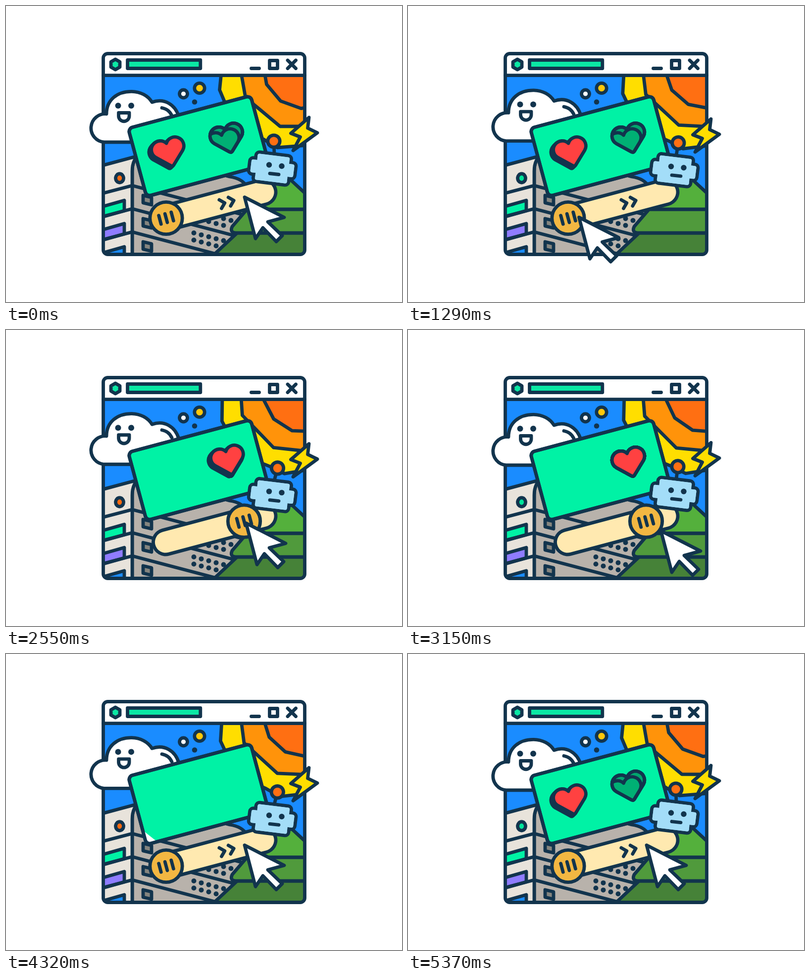
Recreate the animation shown at these times as an HTML page. Size 800x600 px, loop 5.4 s.

```html
<!DOCTYPE html>
<html lang="en">
<head>
<meta charset="utf-8">
<title>Slide the heart</title>
<style>
html, body { margin: 0; width: 100%; height: 100%; overflow: hidden; background: #fff; }
svg { display: block; width: 800px; height: 600px; }
.ink { stroke: #12344d; stroke-width: 6.8; stroke-linejoin: round; stroke-linecap: round; }
.line { fill: none; }
.dot { fill: #12344d; }
</style>
</head>
<body>
<svg viewBox="0 0 800 600">
  <defs>
    <path id="heart" d="M0-17.200A18 18 0 1 0-28.500 4.500L-3 29Q0 31.500 3 29L28.500 4.500A18 18 0 1 0 0-17.200Z"/>
    <rect id="cardShape" x="-128" y="-71.500" width="256" height="143" rx="9" transform="translate(389 284) rotate(-15)"/>
    <clipPath id="view"><rect x="196.500" y="140" width="407" height="363.500" rx="6"/></clipPath>
    <clipPath id="cardClip"><use href="#cardShape"/></clipPath>
    <clipPath id="slotClip"><use href="#heart" transform="translate(447 267) rotate(-15)"/></clipPath>
    <clipPath id="keep"><rect id="keepRect" x="-500" width="2000" height="1500" transform="rotate(38.7)"/></clipPath>
  </defs>

  <rect x="196.500" y="96.500" width="407" height="407" rx="9" fill="#fff"/>
  <g clip-path="url(#view)" class="ink">
    <rect x="190" y="140" width="420" height="370" fill="#1a8cff" stroke="none"/>
    <path id="sunOuter" fill="#ffde00" d="M437 115L431.500 170L447 207L470 245L520 270L548 287L625 281L700 120L600 20Z"/>
    <path id="sunMiddle" fill="#ff930a"/>
    <path id="sunInner" fill="#ff6f12"/>

    <path fill="#b8b2ab" d="M255 510V335Q255 307 274 302L400 332L452 346Q478 350 486 366L500 510Z"/>
    <path fill="#e8e3db" d="M190 324.500L274 302Q255 307 255 335V510H190Z"/>
    <g id="server"></g>
    <ellipse id="led" cx="229.500" cy="349" rx="8" ry="9"/>

    <path fill="#468238" d="M467 460L418 506H610V460Z"/>
    <path fill="#509a3c" d="M487 412L457 447Q451 460 466 460H610V412Z"/>
    <path fill="#54b03c" d="M553 332L487 412H610V385Z"/>
  </g>

  <g class="ink line">
    <rect x="196.500" y="96.500" width="407" height="407" rx="9"/>
    <path d="M196.500 140.700H603.500M495.500 126.500H511.500M532.500 110.500H548.500V126.500H532.500ZM569 110L585.500 126.500M585.500 110L569 126.500"/>
    <path fill="#0be8a4" d="M221 108L230 113.200V123.800L221 129L212 123.800V113.200ZM245.500 109.500H392.800V126.500H245.500Z"/>
    <circle cx="358.500" cy="178" r="8" fill="#fff"/>
    <circle cx="391" cy="166.500" r="10.200" fill="#ffc80a"/>
  </g>
  <circle class="dot" cx="381" cy="194.500" r="5.300"/>

  <g id="cloud" class="ink" fill="#fff">
    <path d="M198 276A28.700 28.700 0 1 1 203 218.800C203 190 225 173.300 253 173.300C272 173.300 287 182 295 195C320 186 342 200 349 224V276Z"/>
    <path class="line" d="M315 206.500Q329 209 335 222"/>
    <path d="M227.500 216.500H249V223A10.700 10.700 0 0 1 227.500 223Z"/>
    <g class="dot" stroke="none"><circle cx="226.500" cy="202" r="6"/><circle cx="253" cy="202" r="6"/></g>
  </g>

  <path id="bolt" class="ink" fill="#ffde00" d="M612 226L575.500 258L594.500 265.500L580 293L629 257L609.500 247.500Z"/>

  <g id="pill" stroke-linecap="round">
    <path d="M322.500 430L520 377.300" stroke="#12344d" stroke-width="56.800"/>
    <path d="M322.500 430L520 377.300" stroke="#ffe9b0" stroke-width="43.200"/>
  </g>
  <g id="chevrons" class="ink line">
    <path transform="translate(437 400.500) rotate(-15)" d="M-4-9L5 0L-4 9M15-9L24 0L15 9"/>
  </g>

  <use href="#cardShape" class="ink" fill="#00f2a5"/>
  <g clip-path="url(#cardClip)">
    <rect id="shine" x="-500" width="2000" height="90" fill="#fff" transform="rotate(38.7)"/>
  </g>
  <g clip-path="url(#keep)">
    <g id="slot" class="ink" fill="#00b074">
      <use href="#heart" transform="translate(447 267) rotate(-15)" fill="#00a56d"/>
      <g clip-path="url(#slotClip)"><use href="#heart" transform="translate(440 278.500) rotate(-15)"/></g>
      <use href="#heart" transform="translate(447 267) rotate(-15)" fill="none"/>
    </g>
    <g id="piece" class="ink">
      <g id="depth" fill="#12344d"></g>
      <use href="#heart" transform="rotate(-15)" fill="#ff4141"/>
    </g>
  </g>
  <use href="#cardShape" class="ink line"/>

  <g id="handle" class="ink">
    <circle r="32.700" fill="#f2b742"/>
    <path transform="rotate(-15)" d="M-13-9V9M0-9V9M13-9V9"/>
  </g>

  <g id="robot">
    <g id="antenna" class="ink">
      <path d="M0 0L-1-24"/>
      <circle cx="-1" cy="-26" r="12.200" fill="#ff6f12"/>
    </g>
    <g transform="translate(538 329.500) rotate(7)" fill="#a3ddf8">
      <g class="ink">
        <rect x="-36" y="-30" width="72" height="60" rx="7"/>
        <rect x="-47" y="-17" width="94" height="33" rx="7"/>
      </g>
      <rect x="-32.600" y="-26.600" width="65.200" height="53.200" rx="4"/>
      <rect x="-43.600" y="-13.600" width="87.200" height="26.200" rx="4"/>
    </g>
    <circle class="dot" cx="531.500" cy="322" r="5.700"/>
    <circle class="dot" cx="557" cy="324.500" r="5.700"/>
    <path class="ink" d="M533 339.500L551 341.500"/>
  </g>

  <path id="cursor" class="ink" fill="#fff" d="M0 0L80 41L47 50L76 78L64 90L37 62L22 84Z"/>
</svg>

<script>
const LOOP = 5400, BOB = 1800;
const el = id => document.getElementById(id);
const set = (id, name, value) => el(id).setAttribute(name, value);
const clamp = x => Math.min(1, Math.max(0, x));
const ramp = (t, from, to) => clamp((t - from) / (to - from));
const inOut = x => x < .5 ? 2 * x * x : 1 - 2 * (1 - x) ** 2;
const ease = (t, from, to) => inOut(ramp(t, from, to));
const pop = x => 1 + 2.2 * (x - 1) ** 3 + 1.2 * (x - 1) ** 2;
const mix = (a, b, k) => a.map((v, i) => v + (b[i] - v) * k);
const move = p => `translate(${p[0]} ${p[1]})`;

function polygon(cx, cy, radius, sides, start) {
  const points = Array.from({ length: sides }, (_, i) => {
    const a = (start + i * 360 / sides) * Math.PI / 180;
    return `${cx + radius * Math.cos(a)} ${cy + radius * Math.sin(a)}`;
  });
  return 'M' + points.join('L') + 'Z';
}

function buildServer() {
  let art = '';
  ['#00f2a5', '#8f7cff', '#1a8cff'].forEach((color, i) => {
    const y = i * 47;
    art += `<path fill="${color}" d="M190 ${408 + y}L239 ${394 + y}V${415 + y}L190 ${429 + y}Z"/>
      <path fill="#85857f" d="M277 ${384 + y}L294 ${388 + y}V${403 + y}L277 ${399 + y}Z"/>
      <path class="line" d="M190 ${381 + y}L255 ${364 + y}L475 ${422 + y}"/>`;
  });
  const rows = [[379.5, 460, 5], [379.5, 474.5, 5], [409.5, 437, 3], [424.5, 427, 3]];
  for (const [x, y, count] of rows)
    for (let i = 0; i < count; i++)
      art += `<circle class="dot" stroke="none" cx="${x + i * 15}" cy="${y + i * 3.9}" r="5"/>`;
  el('server').innerHTML = art;
}

const REST = [482, 387.5], GRAB = [330, 433], DROP = [485, 391.5], AWAY = [529, 418];

function cursorAt(t) {
  if (t < 1800) return mix(REST, GRAB, ease(t, 780, 1440));
  if (t < 2800) return mix(GRAB, DROP, ease(t, 1870, 2550));
  if (t < 3700) return mix(DROP, AWAY, ease(t, 2850, 3400));
  return mix(AWAY, REST, ease(t, 3750, 4300));
}

function update(t) {
  const bob = (1 - Math.cos(2 * Math.PI * t / BOB)) / 2;
  set('cloud', 'transform', move([0, -4 * bob]));
  set('bolt', 'transform', move([0, 5 * bob]));
  set('robot', 'transform', move([0, 5.5 * bob]));
  set('antenna', 'transform', `translate(542 300) rotate(${18 * bob})`);
  set('led', 'fill', t % BOB < 900 ? '#ff6a10' : '#00e59b');

  const turn = 1 - Math.abs(t / LOOP * 2 - 1);
  set('sunOuter', 'transform', `rotate(${-5.3 * turn} 603 122)`);
  set('sunMiddle', 'd', polygon(599, 119, 133, 9, 110 + 6.4 * turn));
  set('sunInner', 'd', polygon(603.5, 123, 85, 12, 125 - 18.5 * turn));

  set('cursor', 'transform', move(cursorAt(t)));
  const drag = ease(t, 1870, 2550);
  const slide = drag - ease(t, 3900, 4250);
  set('handle', 'transform', move(mix([323.5, 430], [481, 387.5], slide)));
  set('chevrons', 'opacity', 1 - ramp(t, 1900, 2050) + ramp(t, 4120, 4270));

  // A white band crosses the card and takes the solved heart with it.
  const edge = -260 + 385 * ramp(t, 3760, 4350);
  set('shine', 'y', edge);
  el('shine').style.display = t > 3760 && t < 4350 ? '' : 'none';
  const reset = t >= 4350;
  set('keepRect', 'y', reset ? -1000 : edge - (t < 3760 ? 600 : 0));

  const seat = reset ? 0 : ease(t, 2620, 2880);
  const pos = mix(mix([328.5, 295], [448.5, 263], reset ? 0 : drag), [447, 267], seat);
  const size = reset ? pop(ramp(t, 4600, 4950)) : 1;
  const slotSize = reset ? pop(ramp(t, 4480, 4830)) : 1;
  set('piece', 'transform', `${move(pos)} scale(${Math.max(0, size)})`);
  set('slot', 'transform', `translate(447 267) scale(${Math.max(0, slotSize)}) translate(-447 -267)`);
  el('piece').style.display = size > .02 ? '' : 'none';
  el('slot').style.display = slotSize > .02 ? '' : 'none';
  [...el('depth').children].forEach((layer, i) => {
    const d = (i + 1) * 1.2 * (1 - seat);
    layer.setAttribute('transform', `translate(${-d} ${d}) rotate(-15)`);
  });
}

buildServer();
el('depth').innerHTML = '<use href="#heart"/>'.repeat(4);
const begin = performance.now();
function frame() {
  update((performance.now() - begin) % LOOP);
  requestAnimationFrame(frame);
}
update(0);
requestAnimationFrame(frame);
</script>
</body>
</html>
```
